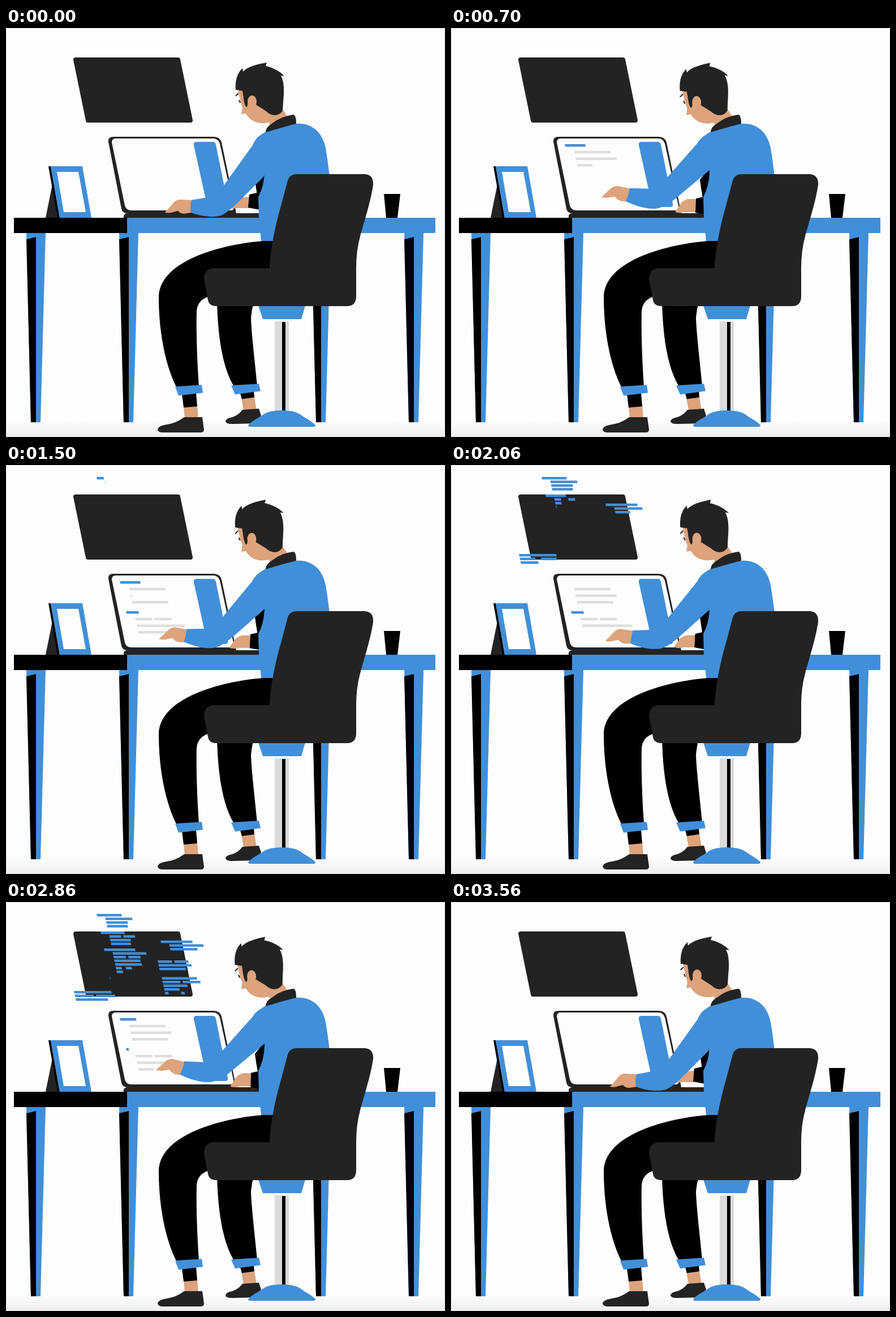
An HTML page for the animation above (3.58 s loop, 776 by 722 pixels).

```html
<!DOCTYPE html>
<html lang="en">
<head>
<meta charset="utf-8">
<title>Working at the desk</title>
<style>
  html, body { margin: 0; width: 776px; height: 722px; overflow: hidden; background: #fdfdfd; }
  svg { display: block; }
  .blue { fill: #418fd9; }
  .dark { fill: #232323; }
  .skin { fill: #dca37c; }
  .pale { fill: #fdfdfd; }
  .grey { fill: #dededc; }
</style>
</head>
<body>
<svg width="776" height="722" viewBox="0 0 776 722">
  <defs>
    <linearGradient id="floor" x2="0" y2="1">
      <stop stop-color="#fdfdfd"/><stop offset="1" stop-color="#eeeeee"/>
    </linearGradient>
    <g id="leg">
      <path class="blue" d="M36 362H70L61 696H44Z"/>
      <path d="M36 373L53 369V696H44Z"/>
    </g>
  </defs>
  <rect class="pale" width="776" height="722"/>
  <rect y="694" width="776" height="28" fill="url(#floor)"/>
  <rect x=".5" y=".5" width="775" height="721" fill="none" stroke="#e2e2e2"/>

  <!-- wall screen -->
  <path class="dark" d="M123 56H304L326 163H145Z" stroke="#232323" stroke-width="8" stroke-linejoin="round"/>
  <path id="code" class="blue"/>

  <!-- laptop -->
  <path class="dark" d="M190 192H367Q378 192 381 202L407 327H214Q206 327 204 319L181 201Q180 192 190 192Z"/>
  <path class="pale" d="M194 195H366Q375 195 378 204L402 314Q404 322 397 322H222Q212 322 210 313L187 202Q187 195 194 195Z"/>
  <path class="dark" d="M208 335V331Q210 327 215 327H448V335Z"/>
  <path class="blue" d="M337 201H365Q370 201 371 206L392 310Q393 316 388 316H361Q356 316 355 311L332 207Q331 201 337 201Z"/>
  <path id="titles" class="blue"/>
  <path id="text" class="grey"/>

  <!-- picture frame, desk, cup -->
  <path class="dark" d="M82 276L70 335H92Z"/>
  <path d="M75 244H79L95 335H91Z"/>
  <path class="blue" d="M79 244H135L151 335H95Z"/>
  <path class="pale" d="M90 254H128L141 325H102Z"/>
  <use href="#leg"/><use href="#leg" x="164"/><use href="#leg" x="504"/><use href="#leg" x="668"/>
  <path d="M14 335H214V362H14Z"/>
  <path class="blue" d="M214 335H759V362H214Z"/>
  <path d="M668 293H697L692 335H672Z"/>

  <!-- far leg, then near leg -->
  <path class="skin" d="M416 653L439 651L443 675H420Z"/>
  <path d="M414 645L438 641L439 652L417 655Z"/>
  <path class="dark" d="M418 674L447 672L451 684L440 698L400 699Q388 699 388 694Q389 689 400 687Q410 684 418 674Z"/>
  <path d="M373 480C374 540 382 600 404 634L444 631C440 590 434 540 433 512Q434 498 438 484Z"/>
  <path class="blue" d="M398 631L447 628L450 641L405 647Z"/>
  <path class="skin" d="M314 668L338 666L340 689H316Z"/>
  <path d="M311 646L336 644L338 668L314 670Z"/>
  <path class="dark" d="M315 687L347 687L350 709Q350 714 344 714L275 714Q268 713 268 708Q270 702 284 700Q300 698 315 687Z"/>
  <path d="M480 375C425 374 272 398 270 475C270 540 283 600 303 637L341 633C338 590 336 540 337 500Q338 481 358 474L480 480Z"/>
  <path class="blue" d="M299 633L346 630L348 644L305 649Z"/>

  <!-- far arm, body, head -->
  <path id="farHand" class="skin"/>
  <path id="farCuff"/>
  <path d="M462 240L440 268Q442 284 445 300L458 300Z"/>
  <path class="blue" d="M440 204Q444 191 459 183L510 163L513 169C542 167 560 186 565 212Q569 235 572 262L560 376H451L447 335L446 298Q457 278 457 250Z"/>
  <g id="head">
    <path class="skin" d="M410 108L415 132L418 141L416 152L424 151C430 162 442 169 456 168L465 167L468 178L500 160L488 142L450 105Z"/>
    <path class="dark" d="M406 109C405 94 408 80 418 71L419 77C427 68 444 64 461 61L459 67C472 70 484 76 492 85L486 84C492 95 492 112 490 130L489 146Q484 154 474 154Q466 153 460 147L443 136L428 127L427 137L425 140C420 135 420 120 418 111Z"/>
    <ellipse class="skin" cx="435" cy="130" rx="8" ry="11"/>
    <path d="M406 120L411 115M412 127L414 132" fill="none" stroke="#232323" stroke-width="2"/>
  </g>
  <path class="dark" d="M459 184Q459 175 471 168Q486 156 508 153Q513 154 513 169C500 172 480 178 459 184Z"/>
  <path id="hand" class="skin"/>
  <path id="arm" class="blue"/>

  <!-- chair -->
  <path class="blue" d="M446 490H529L522 514H454Z"/>
  <path fill="#dadad9" d="M475 518H500V677H475Z"/>
  <path d="M488 519H494V677H488Z"/>
  <path class="blue" d="M428 701C436 692 446 689 455 682Q465 675 487 675Q510 675 520 682C529 689 538 692 547 701Q547 704 543 704H432Q428 704 428 701Z"/>
  <path class="dark" d="M514 258H634Q650 259 649 277C644 310 632 345 626 368Q619 393 619 424V475Q618 491 603 491H372Q359 491 357 480L350 443Q351 424 368 424H466C467 390 477 345 486 314L498 269Q502 258 514 258Z"/>
</svg>
<script>
const LOOP = 3580, SWAY = LOOP / 3, RETYPE = LOOP / 4;
const SLANT = .21, INDENT = 14, GAP = 4;
const el = id => document.getElementById(id);
const clamp = v => Math.min(1, Math.max(0, v));

// Each limb as a lowered and a raised outline with matching points
const limbs = {
  arm: [
    "M459 185C446 189 440 197 436 207L385 278C376 291 362 298 350 300L328 304Q325 315 327 326C345 333 365 335 380 331C394 325 404 313 414 304L455 263L475 220Z",
    "M459 185C446 189 440 196 435 204L383 263C374 275 362 282 350 284L316 283Q314 296 309 306C325 314 345 320 362 319C378 317 390 307 402 297L457 251L475 220Z"
  ],
  hand: [
    "M329 304L306 303Q300 304 296 309L281 326Q290 328 296 325L304 323Q308 328 315 328L329 326Z",
    "M317 284L295 279Q286 279 280 286L266 299Q275 301 282 299L290 298Q294 304 301 306L311 307Z"
  ],
  farHand: [
    "M431 298L413 299L403 303L391 317Q400 320 408 318L430 318Z",
    "M434 302L417 302L408 307L396 325Q405 328 412 325L434 325Z"
  ],
  farCuff: [
    "M430 294L447 290L449 321L428 317Z",
    "M433 301L447 298L449 329L432 326Z"
  ]
};

// Paragraphs on the wall screen; every third row from `split` has a word gap
const paragraphs = [
  { x: 160, y: 21, rows: 4, width: 44, start: 1405, indent: INDENT },
  { x: 167, y: 52, rows: 4, width: 42, start: 1773, indent: INDENT, split: 1 },
  { x: 173, y: 82, rows: 7, width: 55, start: 2141, indent: INDENT, split: 2 },
  { x: 183, y: 132, rows: 2, width: 44, start: 2853, indent: INDENT },
  { x: 273, y: 68, rows: 3, width: 56, start: 1690, indent: INDENT },
  { x: 268, y: 103, rows: 3, width: 54, start: 2065, pace: 10, split: 0 },
  { x: 275, y: 132.5, rows: 5, width: 62, start: 2406, split: 1 },
  { x: 120, y: 157, rows: 3, width: 66, start: 1690, split: 1 }
];

const mix = ([a, b], k) => {
  const ends = b.match(/[\d.]+/g);
  let i = 0;
  return a.replace(/[\d.]+/g, v => +v + (ends[i++] - v) * k);
};

const bar = (x, y, width, share) =>
  share > 0 ? `M${x} ${y}h${width * share}l1 4.5H${x + 1}Z` : "";

function row(x, y, width, share, split) {
  if (!split) return bar(x, y, width, share);
  const half = (width - GAP) / 2;
  return bar(x, y, half, share) + bar(x + half + GAP, y, half, share);
}

// All rows shrink away together before the loop restarts
const remaining = t => 1 - clamp((t - 3200) / 340);

function codeAt(t) {
  let d = "";
  for (const { x, y, rows, width, start, pace = 92, indent = 0, split } of paragraphs)
    for (let i = 0; i < rows; i++) {
      const drop = 6.5 * i;
      const share = clamp((t - start - pace * i) / 340) * remaining(t);
      const length = width * (1 + .1 * Math.sin(2 * i) - .015 * i * i);
      d += row(x + SLANT * drop + (i && indent), y + drop, length, share, i % 3 === split);
    }
  return d;
}

// Laptop rows are typed in turn, then each is briefly wiped and retyped
function laptopShare(n, t) {
  const typed = clamp((t - 100 - 165 * n) / 250);
  const phase = t / RETYPE - .3 - .71 * n;
  const distance = Math.abs(phase - Math.round(phase));
  const kept = t > 1400 ? clamp((distance - .04) / .08) : 1;
  return typed * kept * remaining(t);
}

function drawLaptop(t) {
  let titles = "", text = "";
  for (let n = 0; n < 8; n++) {
    const block = n >> 2, i = n % 4, drop = 11.7 * i;
    const x = 201 + 11 * block + SLANT * drop + (i && INDENT);
    const y = 205 + 53 * block + drop;
    const share = laptopShare(n, t);
    if (i) text += row(x, y, 64 + (8 + 16 * block) * Math.sin((i - 1) * Math.PI / 2), share, n === 5);
    else titles += row(x, y, 36 - 14 * block, share);
  }
  el("titles").setAttribute("d", titles);
  el("text").setAttribute("d", text);
}

function draw(now) {
  const t = now % LOOP;
  const lift = (1 + Math.cos(2 * Math.PI * (t / SWAY - .475))) / 1.746;
  for (const id in limbs) el(id).setAttribute("d", mix(limbs[id], lift));
  el("head").setAttribute("transform", `rotate(${-1.5 * lift} 475 160)`);
  el("code").setAttribute("d", codeAt(t));
  drawLaptop(t);
  requestAnimationFrame(draw);
}
requestAnimationFrame(draw);
</script>
</body>
</html>
```
